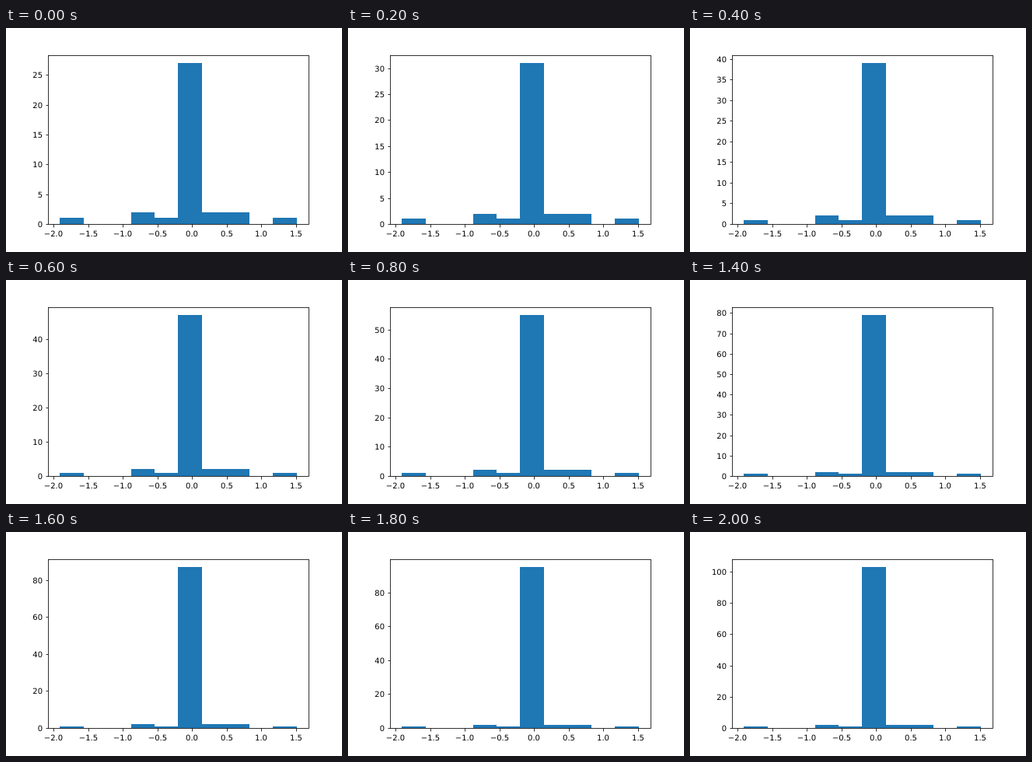
Write an HTML page that moves like this. It is 432x288 px and loops after 2100 ms.

```html
<!DOCTYPE html>
<html lang="en">
<head>
<meta charset="utf-8">
<title>Growing histogram</title>
<style>
  html, body { margin: 0; width: 100%; height: 100%; overflow: hidden; background: #fff; }
  svg { display: block; width: 432px; height: 288px; }
  text { font: 10px "DejaVu Sans", sans-serif; text-rendering: geometricPrecision; }
  .line { fill: none; stroke: #000; stroke-width: 0.8; }
  .bar { fill: #1f77b4; }
  .x { text-anchor: middle; }
  .y { text-anchor: end; }
</style>
</head>
<body>
<svg viewBox="0 0 432 288">
  <g id="bars"></g>
  <g id="xAxis"></g>
  <g id="yAxis"></g>
  <rect class="line" x="54.5" y="35.5" width="335" height="217"/>
</svg>
<script>
const LOOP = 2100, STEP = 100;
const BASE = 252, LEFT = 54;
const BAR_LEFT = 69.22, BAR_WIDTH = 30.436, PEAK_HEIGHT = 207.09;
const X_ZERO = 239.2, X_UNIT = 89.1;
const START = 27, GAIN = 4;
const layer = id => document.getElementById(id);

const bar = (value, i, scale) => {
  const x = Math.round(BAR_LEFT + i * BAR_WIDTH);
  const right = Math.round(BAR_LEFT + (i + 1) * BAR_WIDTH);
  const y = Math.round(BASE - value * scale);
  return `<rect class="bar" x="${x}" y="${y}" width="${right - x}" height="${BASE - y}"/>`;
};

const xTick = value => {
  const x = Math.round(X_ZERO + value * X_UNIT);
  const label = value.toFixed(1).replace("-", "\u2212");
  return `<path class="line" d="M${x + 0.5} 252.5v4"/><text class="x" x="${x}" y="268">${label}</text>`;
};

const yTick = (value, scale) => {
  const y = Math.round(BASE - value * scale);
  return `<path class="line" d="M${LEFT + 0.5} ${y + 0.5}h-3"/><text class="y" x="47" y="${y + 4}">${value}</text>`;
};

function drawChart(peak) {
  const scale = PEAK_HEIGHT / peak, top = peak * 1.05;
  const counts = [1, 0, 0, 2, 1, peak, 2, 2, 0, 1];
  layer("bars").innerHTML = counts.map((n, i) => n ? bar(n, i, scale) : "").join("");

  // Smallest round spacing that leaves at most nine intervals
  const spacing = [5, 10, 20].find(s => s * 9 >= top);
  let ticks = "";
  for (let v = 0; v <= top; v += spacing) ticks += yTick(v, scale);
  layer("yAxis").innerHTML = ticks;
}

let shown;
function render() {
  const step = Math.floor(performance.now() % LOOP / STEP);
  const peak = START + GAIN * Math.max(0, step - 1);
  if (peak !== shown) drawChart(shown = peak);
  requestAnimationFrame(render);
}

layer("xAxis").innerHTML = Array.from({ length: 8 }, (_, i) => xTick(i / 2 - 2)).join("");
render();
</script>
</body>
</html>
```
